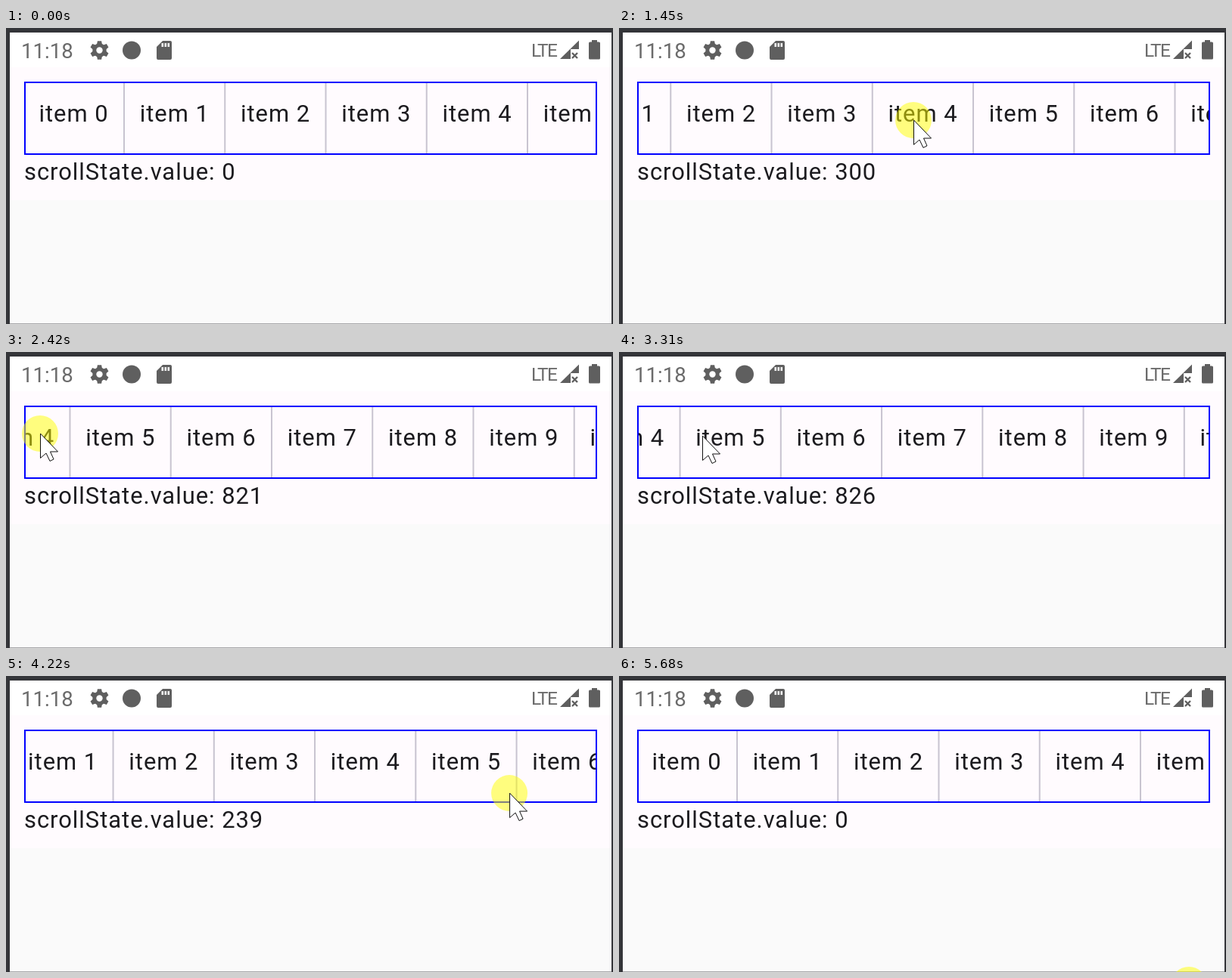
Recreate the animation shown at these times as an HTML page. Size 802 px wide and 392 px high, loop 5.81 s.

```html
<!DOCTYPE html>
<html lang="en">
<head>
<meta charset="utf-8">
<title>Scroll state</title>
<style>
  html, body { margin: 0; width: 100%; height: 100%; overflow: hidden; background: #fafafa; }
  svg { display: block; width: 100%; height: 100%; }
  text { font-family: Roboto, sans-serif; white-space: pre; }
  .body { font-size: 30.94px; letter-spacing: .967px; fill: #1c1b1f; }
  .status { fill: #6b6b6b; }
  .icon { fill: #5f5f5f; }
</style>
</head>
<body>
<svg viewBox="0 0 802 392">
  <defs>
    <clipPath id="row"><rect x="26" y="73" width="753" height="93"/></clipPath>
  </defs>

  <rect width="802" height="392" fill="#fafafa"/>
  <rect y="50" width="802" height="178" fill="#fffbfe"/>
  <rect y="5" width="802" height="47" fill="#fff"/>
  <path d="M0 0H802V6H0ZM0 0H5V392H0ZM800 0H802V392H800Z" fill="#343539"/>
  <path d="M5 391.5H800" stroke="#a9a9ab"/>

  <text class="status" x="20" y="40" font-size="27.6">11:18</text>
  <g id="gear" class="icon" transform="translate(123.5 29.5)"></g>
  <circle class="icon" cx="166" cy="29.5" r="12"/>
  <path class="icon" fill-rule="evenodd" d="M207 17H217Q219 17 219 19V40Q219 42 217 42H201Q199 42 199 40V25ZM205.5 20V25H208V20ZM209.5 20V25H212V20ZM213.5 20V25H216V20Z"/>
  <text class="status" x="694" y="37.5" font-size="24.5" letter-spacing="-1.8">LTE</text>
  <path class="icon" d="M732 41L757 16.500V28H746V41Z"/>
  <path d="M748 33L755 40M755 33L748 40" stroke="#5f5f5f" stroke-width="2.4"/>
  <path class="icon" d="M774 16H781V18.500H783.500Q785 18.500 785 20V40Q785 41.500 783.500 41.500H771.500Q770 41.500 770 40V20Q770 18.500 771.500 18.500H774Z"/>

  <g clip-path="url(#row)"><g id="items"></g></g>
  <rect x="25" y="72" width="755" height="95" fill="none" stroke="#00f" stroke-width="2"/>
  <text class="body" id="label" x="24" y="201"></text>

  <g id="pointer">
    <circle id="halo" r="24" fill="#ff0" fill-opacity=".5"/>
    <path d="M.5 0V32.500L8 26L13 36.500L18 34L13.500 24H23.500Z" fill="#fff" stroke="#111"/>
  </g>
</svg>
<script>
const LOOP = 5810, START = 123, STEP = 69.25;
const PITCH = 133.25, PX_PER_UNIT = 0.7366;
const PRESS = 45, DRAG_BACK = 50, RELEASE = 55;
const $ = id => document.getElementById(id);

// key points: [step, ...values]
const pointerAt = curve([
  [-1, 730, 440], [8, 652, 183], [15, 652, 150], [19, 389, 122],
  [27, 140, 104], [33, 45, 108], [44, 167, 112], [46, 110, 111],
  [50, 100, 118], [54, 470, 139], [64, 795, 163], [67, 845, 163],
  [70, 795, 163], [77, 778, 420], [80, 753, 409]
]);
const scrollAt = curve([
  [16.7, 0], [19, 300], [27, 662], [34, 826],
  [50.5, 826], [54, 431], [64, 58], [68, 0]
]);

// Smooth curve through the points that never overshoots them
function curve(pts) {
  const last = pts.length - 1;
  const rate = (i, j) => (pts[i + 1][j] - pts[i][j]) / (pts[i + 1][0] - pts[i][0]);
  const slope = (i, j) => {
    if (i === 0 || i === last) return 0;
    const a = rate(i - 1, j), b = rate(i, j);
    return a * b > 0 ? 2 * a * b / (a + b) : 0;
  };
  return k => {
    k = Math.min(Math.max(k, pts[0][0]), pts[last][0]);
    const i = Math.max(0, pts.findIndex(p => p[0] >= k) - 1);
    const a = pts[i], b = pts[i + 1], h = b[0] - a[0];
    const u = (k - a[0]) / h, w = 1 - u;
    return a.slice(1).map((v, n) => {
      const j = n + 1;
      return v + (b[j] - v) * u * u * (3 - 2 * u)
        + h * u * w * (w * slope(i, j) - u * slope(i + 1, j));
    });
  };
}

function buildGear() {
  let out = '<circle r="6.7" fill="none" stroke="#5f5f5f" stroke-width="5"/>';
  for (let a = 0; a < 360; a += 60)
    out += `<path d="M-3.4 -8L-2.6 -12.3H2.6L3.4 -8Z" transform="rotate(${a})"/>`;
  $('gear').innerHTML = out;
}

function buildItems() {
  let out = '';
  for (let i = 0; i < 14; i++) {
    const x = i * PITCH;
    out += `<text class="body" x="${43.5 + x}" y="124">item ${i}</text>` +
      `<rect x="${155 + x}" y="73" width="2" height="93" fill="#c8c4d0"/>`;
  }
  $('items').innerHTML = out;
}

function render(t) {
  const k = Math.floor((t - START) / STEP);
  const [x, y] = pointerAt(k);
  const [scroll] = scrollAt(k);
  // once released, the label trails the row by one step
  const [shown] = scrollAt(k > RELEASE ? k - 1 : k);

  $('items').setAttribute('transform', `translate(${-scroll * PX_PER_UNIT} 0)`);
  $('label').textContent = `scrollState.value: ${Math.round(shown)}`;
  $('pointer').setAttribute('transform', `translate(${x} ${y})`);
  $('pointer').style.display = k < 0 ? 'none' : '';
  $('halo').style.display = k >= PRESS && k < DRAG_BACK ? 'none' : '';
}

buildGear();
buildItems();
const begin = performance.now();
function tick() {
  render((performance.now() - begin) % LOOP);
  requestAnimationFrame(tick);
}
tick();
</script>
</body>
</html>
```
